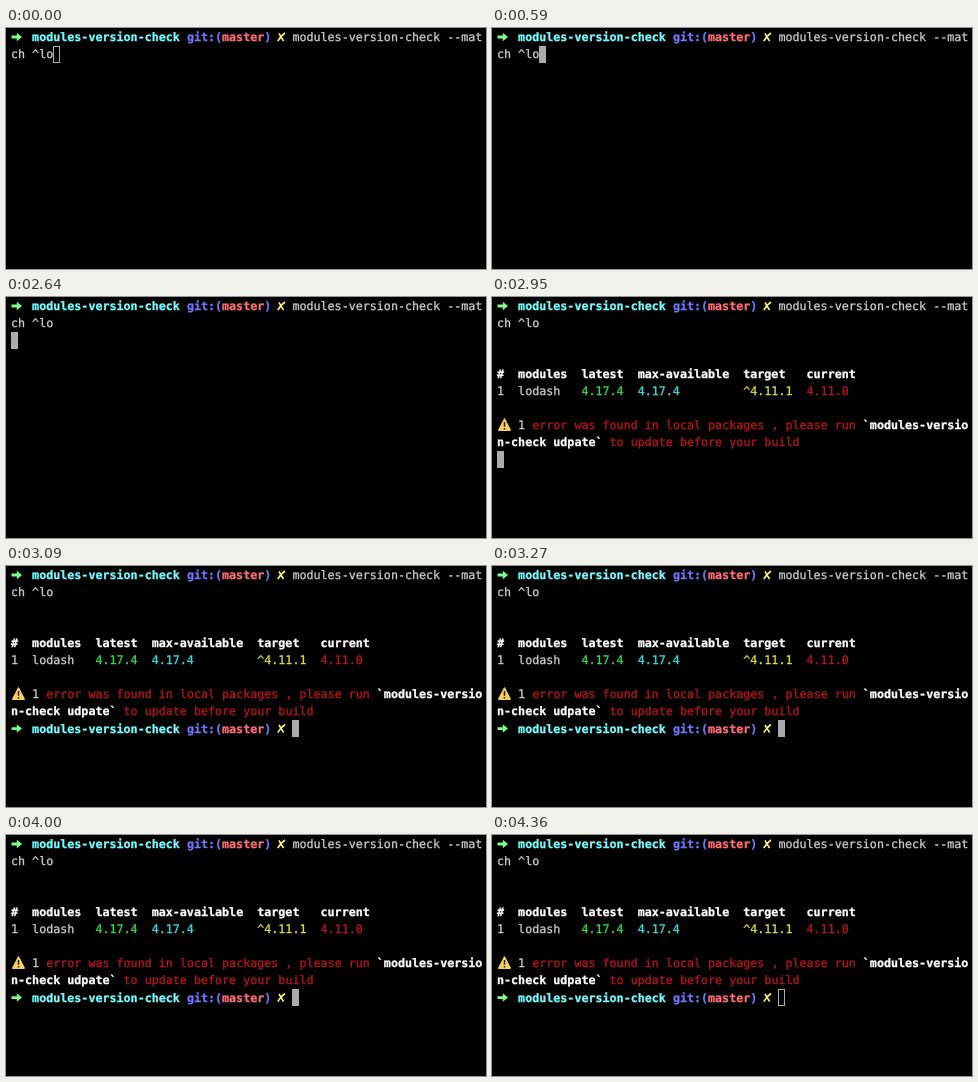
An HTML page that plays this animation: 480x241 px, repeating every 4400 ms.

```html
<!DOCTYPE html>
<html lang="en">
<head>
<meta charset="utf-8">
<title>Terminal session</title>
<style>
  html, body { margin: 0; width: 100%; height: 100%; overflow: hidden; background: #000; }
  svg { display: block; width: 480px; height: 241px; }
  text {
    font: 11.69px "DejaVu Sans Mono", "Liberation Mono", monospace;
    text-rendering: geometricPrecision;
    white-space: pre;
    stroke-width: 0.3px;
  }
  .bold { font-weight: bold; }
</style>
</head>
<body>
<svg id="screen" viewBox="0 0 480 241"></svg>
<script>
const LOOP = 4400;
const CELL = 7.035, LINE = 17.06, LEFT = 5, BASELINE = 13;
const GRAY = '#cdcdcd', WHITE = '#fff', RED = '#b8161c';
const screen = document.getElementById('screen');

function add(parent, tag, attrs) {
  const node = document.createElementNS('http://www.w3.org/2000/svg', tag);
  for (const key in attrs) node.setAttribute(key, attrs[key]);
  return parent.appendChild(node);
}

function write(parent, row, col, text, color, bold) {
  add(parent, 'text', {
    x: LEFT + col * CELL, y: BASELINE + row * LINE,
    fill: color, stroke: color, class: bold ? 'bold' : ''
  }).textContent = text;
}

function prompt(parent, row) {
  const marks = add(parent, 'g', { transform: `translate(0 ${row * LINE})` });
  add(marks, 'path', { d: 'M5.5 7.6H10.8V4.8L16 9L10.8 13.2V10.4H5.5Z', fill: '#7dfc8a' });
  add(marks, 'path', {
    d: 'M271.8 13.2Q274.5 8 279 5M273 5.4Q274.8 9 277.6 13',
    fill: 'none', stroke: '#fffb70', 'stroke-width': 1.6
  });
  write(parent, row, 3, 'modules-version-check', '#76fdff', true);
  write(parent, row, 25, 'git:(', '#7376ff', true);
  write(parent, row, 30, 'master', '#ff6d76', true);
  write(parent, row, 36, ')', '#7376ff', true);
}

const command = add(screen, 'g');
prompt(command, 0);
write(command, 0, 40, 'modules-version-check --mat', GRAY);
write(command, 1, 0, 'ch ^lo', GRAY);

const report = add(screen, 'g');
const columns = [
  [0, '#', '1', GRAY],
  [3, 'modules', 'lodash', GRAY],
  [12, 'latest', '4.17.4', '#30dc4c'],
  [20, 'max-available', '4.17.4', '#38dcdc'],
  [35, 'target', '^4.11.1', '#dcdc40'],
  [44, 'current', '4.11.0', RED]
];
for (const [col, title, value, color] of columns) {
  write(report, 4, col, title, WHITE, true);
  write(report, 5, col, value, color);
}
add(report, 'path', {
  d: 'M12.5 122L18.2 133.2H6.8Z', fill: '#f3d060', stroke: '#f3d060',
  'stroke-width': 1.5, 'stroke-linejoin': 'round'
});
add(report, 'path', { d: 'M12.5 125V129.7M12.5 131V132.6', stroke: '#222', 'stroke-width': 1.5 });
write(report, 7, 3, '1', GRAY);
write(report, 7, 5, 'error was found in local packages , please run', RED);
write(report, 7, 52, '`modules-versio', WHITE, true);
write(report, 8, 0, 'n-check udpate`', WHITE, true);
write(report, 8, 16, 'to update before your build', RED);

const nextPrompt = add(screen, 'g');
prompt(nextPrompt, 9);

const cursor = add(screen, 'rect', { width: 6, height: 16, stroke: '#ababab' });

// Each state: start time, cursor row, cursor column, terminal focused
const states = [
  [0, 1, 6, false],
  [590, 1, 6, true],
  [1320, 2, 0, true],
  [2950, 9, 0, true],
  [3000, 9, 40, true],
  [4050, 9, 40, false]
];

function show(node, visible) {
  node.setAttribute('visibility', visible ? 'visible' : 'hidden');
}

function frame() {
  const time = performance.now() % LOOP;
  const [, row, col, focused] = states.filter(state => state[0] <= time).pop();
  cursor.setAttribute('x', Math.round(LEFT + col * CELL) + 0.5);
  cursor.setAttribute('y', Math.round(0.5 + row * LINE) + 0.5);
  cursor.setAttribute('fill', focused ? '#ababab' : 'none');
  show(report, time >= 2950);
  show(nextPrompt, time >= 3000);
  requestAnimationFrame(frame);
}
frame();
</script>
</body>
</html>
```
